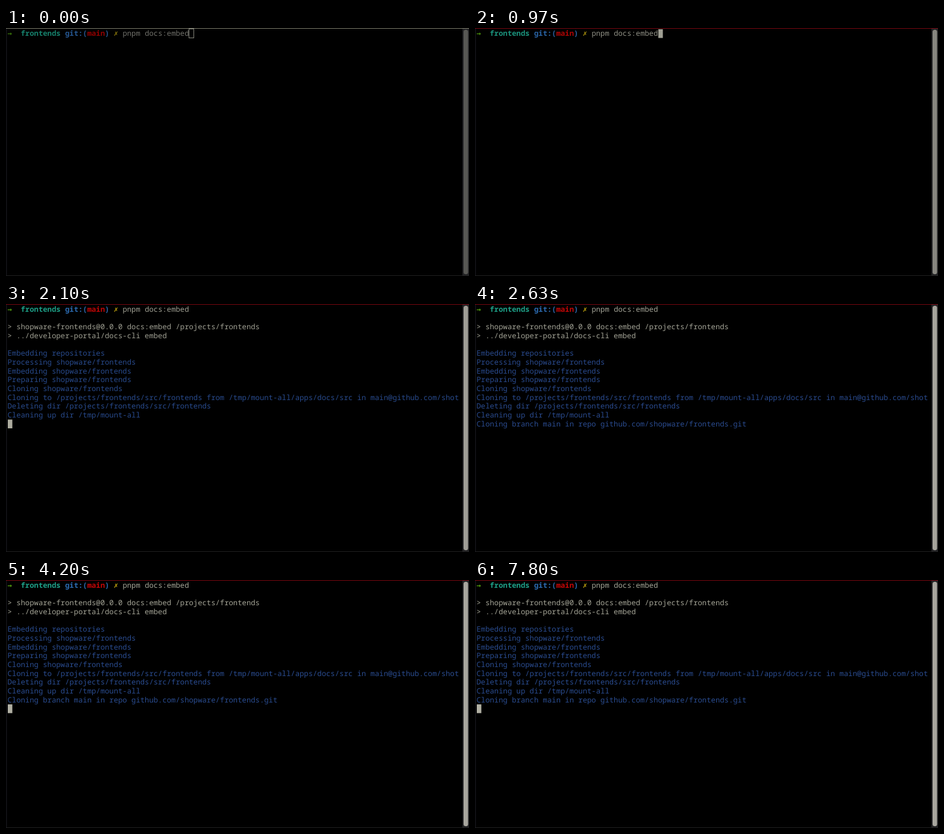
These frames come from a looping animation (768 by 413 pixels, 8 s). An HTML page:

```html
<!DOCTYPE html>
<html lang="en">
<head>
<meta charset="utf-8">
<title>Terminal</title>
<style>
  html, body { margin: 0; width: 100%; height: 100%; overflow: hidden; background: #000; }
  svg { display: block; width: 768px; height: 413px; }
  text {
    font: 12.24px "Noto Sans Mono", "DejaVu Sans Mono", monospace;
    white-space: pre;
    text-rendering: geometricPrecision;
    font-variant-ligatures: none;
  }
  .bold { font-weight: 700; }
  .symbol { font-family: "DejaVu Sans Mono", "DejaVu Sans", monospace; font-weight: 700; }
</style>
</head>
<body>
<svg id="stage" viewBox="0 0 768 413"></svg>
<script>
const LOOP = 8000, LEFT = 2.5, CELL = 7.344, ROW = 14.65;
const stage = document.getElementById('stage');
const tinted = [];

function add(tag, attrs, content) {
  const el = document.createElementNS('http://www.w3.org/2000/svg', tag);
  for (const name in attrs) el.setAttribute(name, attrs[name]);
  if (content) el.textContent = content;
  stage.appendChild(el);
  return el;
}

// Registers an element whose fill brightens from one colour to another.
function tint(el, from, to) {
  tinted.push({ el, from, to });
  return el;
}

function write(col, row, content, [from, to], style = '') {
  const el = add('text', {
    x: LEFT + col * CELL, y: 13.1 + row * ROW, class: style
  }, content);
  return tint(el, from, to);
}

const rect = (x, y, width, height, fill, rx = 0) =>
  add('rect', { x, y, width, height, fill, rx });

rect(0, 0, 768, 413, '#000');
rect(0, 1, 1.5, 412, '#141418');
rect(757, 1, 11, 412, '#222224');
rect(0, 412, 768, 1, '#202020');
const topEdge = rect(0, 0, 768, 1, '#7c7c6c');
tint(rect(759, 3, 7.5, 407, '#666', 3.5), [88, 88, 84], [168, 166, 158]);

// Colours as [dim, bright]
const GRAY = [[112, 112, 106], [164, 164, 150]];
const BLUE = [[38, 88, 146], [44, 108, 178]];
const NAVY = [[28, 54, 104], [42, 76, 144]];
const TEAL = [[22, 128, 108], [30, 160, 136]];
const GREEN = [[58, 118, 10], [84, 160, 14]];
const RED = [[146, 0, 0], [200, 6, 6]];
const GOLD = [[138, 120, 12], [196, 166, 14]];

write(0, 0, '→', GREEN, 'symbol');
write(3, 0, 'frontends', TEAL, 'bold');
write(13, 0, 'git:(', BLUE, 'bold');
write(18, 0, 'main', RED, 'bold');
write(22, 0, ')', BLUE, 'bold');
write(24, 0, '✗', GOLD, 'symbol');
write(26, 0, 'pnpm docs:embed', GRAY);

// Output: [time, row, text]
const output = [
  [2030, 2, '> shopware-frontends@0.0.0 docs:embed /projects/frontends'],
  [2030, 3, '> ../developer-portal/docs-cli embed'],
  [2070, 5, 'Embedding repositories'],
  [2070, 6, 'Processing shopware/frontends'],
  [2070, 7, 'Embedding shopware/frontends'],
  [2070, 8, 'Preparing shopware/frontends'],
  [2070, 9, 'Cloning shopware/frontends'],
  [2070, 10, 'Cloning to /projects/frontends/src/frontends from /tmp/mount-all/apps/docs/src in main@github.com/shot'],
  [2070, 11, 'Deleting dir /projects/frontends/src/frontends'],
  [2070, 12, 'Cleaning up dir /tmp/mount-all'],
  [2200, 13, 'Cloning branch main in repo github.com/shopware/frontends.git']
].map(([at, row, content]) => ({
  at, el: write(0, row, content, row < 4 ? GRAY : NAVY)
}));

const cursor = rect(0, 0, 7.5, 14.6, '#aaa');
tint(cursor, [132, 132, 122], [178, 177, 164]);
const hollow = add('rect', {
  x: 303.5, y: 1.5, width: 8, height: 15, fill: 'none', stroke: '#84847a'
});

// Cursor stops: [time, column, row]
const stops = [[0, 41, 0], [1170, 0, 1], [2030, 0, 5], [2070, 0, 13], [2200, 0, 14]];
const glow = [[0, 0], [300, 0], [530, .5], [800, .5], [1470, .88], [2030, .88], [2830, 1], [LOOP, 1]];

function level(t) {
  const i = glow.findIndex(key => key[0] > t);
  const [t0, a] = glow[i - 1], [t1, b] = glow[i];
  return a + (b - a) * (t - t0) / (t1 - t0);
}

const show = (el, on) => el.setAttribute('visibility', on ? 'visible' : 'hidden');

function cursorOn(t) {
  if (t < 300) return false;
  if (t < 1770) return true;
  if (t < 2030) return false;
  if (t < 2370) return true;
  return Math.floor((t - 2370) / 600) % 2 === 1;
}

function draw(t) {
  const k = level(t);
  for (const { el, from, to } of tinted) {
    const rgb = from.map((v, i) => Math.round(v + (to[i] - v) * k));
    el.setAttribute('fill', `rgb(${rgb})`);
  }
  topEdge.setAttribute('fill', t < 300 ? '#7c7c6c' : '#780610');
  for (const line of output) show(line.el, t >= line.at);

  const [, col, row] = stops.filter(stop => stop[0] <= t).pop();
  cursor.setAttribute('x', LEFT + col * CELL + .5);
  cursor.setAttribute('y', 2 + row * ROW);
  show(cursor, cursorOn(t));
  show(hollow, t < 300);
}

const start = performance.now();
function tick() {
  draw((performance.now() - start) % LOOP);
  requestAnimationFrame(tick);
}
tick();
</script>
</body>
</html>
```
